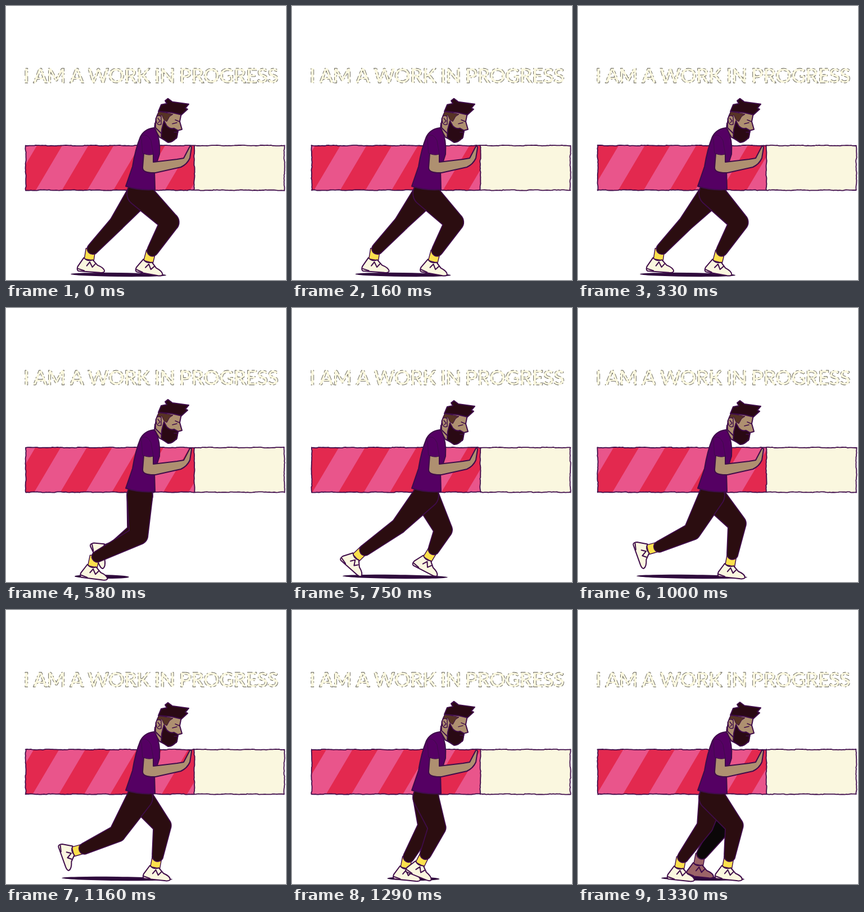
An HTML page with a canvas that plays this animation: 498 px wide and 488 px high, repeating every 1370 ms.

```html
<!DOCTYPE html>
<html lang="en">
<head>
<meta charset="utf-8">
<style>
  html, body { margin: 0; width: 100%; height: 100%; overflow: hidden; background: #fff; }
  canvas { display: block; }
</style>
</head>
<body>
<canvas id="stage" width="498" height="488"></canvas>
<script>
const ctx = document.getElementById('stage').getContext('2d');
const LOOP = 1370, TICKS = 33;
const INK = '#3f0c4a', PANTS = '#2b0d10', SHIRT = '#550063', SKIN = '#ae9070',
      HAIR = '#2a0914', CREAM = '#faf7df', SOCK = '#fbe04d', PINK = '#e9558b', RED = '#e3294f';
const HIP = { x: 238, y: 334 };

const pose = (kneeX, kneeY, x, y, tilt) => ({ kneeX, kneeY, x, y, tilt });
const plant  = pose(278, 384, 269, 443, .08);
const press  = pose(286, 385, 253, 440, .15);
const stand  = pose(226, 385, 184, 444, .08);
const crouch = pose(236, 405, 158, 445, .1);
const drive  = pose(192, 387, 146, 436, .05);
const push   = pose(190, 388, 126, 434, .7);
const trail  = pose(198, 398, 135, 427, 1.2);
const pass   = pose(232, 398, 192, 425, 1.1);
const reach  = pose(269, 395, 250, 434, .45);

// One stride: push and hold, step, push and hold, step.
const beats = [0, 8, 14, 18, 24, 28, 32];
const strideA = [drive, drive, pass, reach, plant, plant, stand];
const strideB = [press, press, crouch, push, trail, trail, plant];

const shapes = {
  sock: 'M-9 -4L8 -4L6 17L-11 15Z',
  shoe: 'M-12 13Q-5 20 4 16L13 25Q25 29 26 35Q25 38 18 38L-20 37Q-24 36 -22 29Z',
  laces: 'M-6 27L-1 20L4 29L9 23M-21 33L-10 36',
  torso: 'M263 217Q246 219 239 233Q230 255 225 286L213 321Q236 329 265 327L264 292L273 264Q275 238 266 220Z',
  arm: 'M245 262L262 263L262 278L304 273L316 271L327 250Q330 249 330 252L327 271Q322 282 311 287L266 297Q243 298 243 288Z',
  sleeve: 'M241 231Q252 226 258 240L262 264Q252 267 243 262Z',
  neck: 'M265 209L279 218L281 238L273 234L264 219Z',
  face: 'M273 187L312 191L309 206L313 220L306 222L303 236L286 240L277 228L266 217Q264 202 273 187Z',
  fade: 'M272 188L297 193L291 197L286 206L281 203L277 194L268 205L266 202Z',
  hair: 'M271 188L276 176L286 174L283 169L288 165L296 171L325 175L319 182L323 184L312 194L295 190Z',
  beard: 'M281 205L286 214Q292 220 299 218L306 222L304 234Q295 244 288 243L276 235L277 220Z',
  ear: 'M276 197Q267 192 267 203Q268 214 276 211Z',
  features: 'M296 210L304 208M301 203L308 206M299 225L304 225M270 200L274 205L271 208'
};
for (const name in shapes) shapes[name] = new Path2D(shapes[name]);

function paint(path, fill, width = 2) {
  ctx.fillStyle = fill;
  ctx.fill(path);
  ctx.strokeStyle = INK;
  ctx.lineWidth = width;
  ctx.stroke(path);
}

function poseAt(stride, tick) {
  const i = beats.findLastIndex(beat => beat <= tick), next = (i + 1) % beats.length;
  const u = (tick - beats[i]) / ((beats[next] || TICKS) - beats[i]);
  const from = stride[i], to = stride[next], now = {};
  for (const key in from) now[key] = from[key] + (to[key] - from[key]) * u;
  // Feet that hold their pose slip back a little.
  const slip = from === to ? 5 * (1 - u) : 0;
  now.x += slip;
  now.kneeX += slip;
  return now;
}

function taper(path, a, b) {
  const dir = Math.atan2(b.y - a.y, b.x - a.x), q = Math.PI / 2;
  const part = new Path2D();
  part.arc(a.x, a.y, a.r, dir + q, dir + 3 * q);
  part.arc(b.x, b.y, b.r, dir - q, dir + q);
  part.closePath();
  path.addPath(part);
}

function leg(p, pants = PANTS, shoe = CREAM, sock = SOCK) {
  ctx.save();
  ctx.translate(p.x, p.y);
  ctx.rotate(p.tilt);
  paint(shapes.sock, sock, 1.4);
  paint(shapes.shoe, shoe);
  ctx.stroke(shapes.laces);
  ctx.restore();

  const thigh = Math.atan2(p.kneeY - HIP.y, p.kneeX - HIP.x);
  const shin = Math.atan2(p.y - p.kneeY, p.x - p.kneeX);
  const knee = { x: p.kneeX, y: p.kneeY, r: 12 + 4 * Math.abs(Math.sin(shin - thigh)) };
  const cuff = { x: p.x - 5 * Math.cos(shin), y: p.y - 5 * Math.sin(shin), r: 9 };
  const limb = new Path2D();
  taper(limb, { ...HIP, r: 22 }, knee);
  taper(limb, knee, cuff);
  ctx.strokeStyle = INK;
  ctx.lineWidth = 3.5;
  ctx.stroke(limb);
  ctx.fillStyle = pants;
  ctx.fill(limb);
}

function title(tick) {
  const text = 'I AM A WORK IN PROGRESS';
  ctx.font = '700 36px Lato, sans-serif';
  ctx.letterSpacing = '-0.95px';
  ctx.fillStyle = CREAM;
  ctx.fillText(text, 31, 137);
  ctx.save();
  ctx.setLineDash([5, 4, 2, 7, 9, 5]);
  ctx.lineDashOffset = tick * 11 % 32;
  ctx.strokeStyle = '#55534a';
  ctx.lineWidth = .8;
  ctx.strokeText(text, 31, 137);
  ctx.restore();
}

// A hand-drawn edge that trembles a little on every tick.
function roughLine(x1, y1, x2, y2, seed) {
  const steps = Math.ceil(Math.hypot(x2 - x1, y2 - y1) / 3);
  const wobble = n => (Math.sin(n * 12.9898 + seed * 78.233) * 43758.5453 % 1) * .7;
  ctx.beginPath();
  for (let i = 0; i <= steps; i++) {
    const u = i / steps;
    ctx.lineTo(x1 + (x2 - x1) * u + wobble(i), y1 + (y2 - y1) * u + wobble(i + .5));
  }
  ctx.stroke();
}

function bar(tick) {
  const left = 35, split = 335, right = 495, top = 248.5, bottom = 328;
  const period = 91.5, slant = 47, band = 45;
  ctx.fillStyle = CREAM;
  ctx.fillRect(left, top, right - left, bottom - top);
  ctx.save();
  ctx.beginPath();
  ctx.rect(left, top, split - left, bottom - top);
  ctx.clip();
  ctx.fillStyle = PINK;
  ctx.fill();
  ctx.fillStyle = RED;
  const shift = tick * 7 / TICKS % 1 * period;
  for (let x = 8 + shift - 2 * period; x < split; x += period) {
    ctx.beginPath();
    ctx.moveTo(x, bottom);
    ctx.lineTo(x + slant, top);
    ctx.lineTo(x + slant + band, top);
    ctx.lineTo(x + band, bottom);
    ctx.fill();
  }
  ctx.restore();
  ctx.strokeStyle = INK;
  ctx.lineWidth = 1.8;
  for (const y of [top, bottom]) roughLine(left, y, right, y, tick + y);
  for (const x of [left, split, right]) roughLine(x, top, x, bottom, tick + x);
}

function shadow(a, b) {
  const from = Math.min(a.x, b.x) - 36, to = Math.max(a.x, b.x) + 27;
  ctx.fillStyle = '#2f0a3d';
  ctx.beginPath();
  ctx.ellipse((from + to) / 2, 478.5, (to - from) / 2, 3.5, .012, 0, 7);
  ctx.fill();
}

function upperBody(lift) {
  ctx.save();
  ctx.translate(0, lift);
  paint(shapes.neck, SKIN);
  paint(shapes.face, SKIN);
  paint(shapes.fade, '#573325', 1);
  paint(shapes.beard, HAIR);
  paint(shapes.hair, HAIR);
  paint(shapes.ear, SKIN, 1.5);
  ctx.stroke(shapes.features);
  ctx.restore();
  paint(shapes.torso, SHIRT);
  paint(shapes.arm, SKIN);
  paint(shapes.sleeve, SHIRT, 1);
}

function draw(now) {
  const tick = Math.floor(now % LOOP / LOOP * TICKS + .2) % TICKS;
  const a = poseAt(strideA, tick), b = poseAt(strideB, tick);
  ctx.fillStyle = '#fff';
  ctx.fillRect(0, 0, 498, 488);
  title(tick);
  bar(tick);
  shadow(a, b);
  // A shaded leg shows between the two as the last step closes.
  if (tick === TICKS - 1) leg(pose(252, 391, 218, 438, .08), '#0b0708', '#9c6468', '#9c6468');
  leg(a);
  leg(b);
  upperBody(Math.min(0, (Math.abs(a.x - b.x) - 115) / 40));
}

ctx.lineJoin = ctx.lineCap = 'round';
const start = performance.now();
function loop() {
  draw(performance.now() - start);
  requestAnimationFrame(loop);
}
loop();
</script>
</body>
</html>
```
